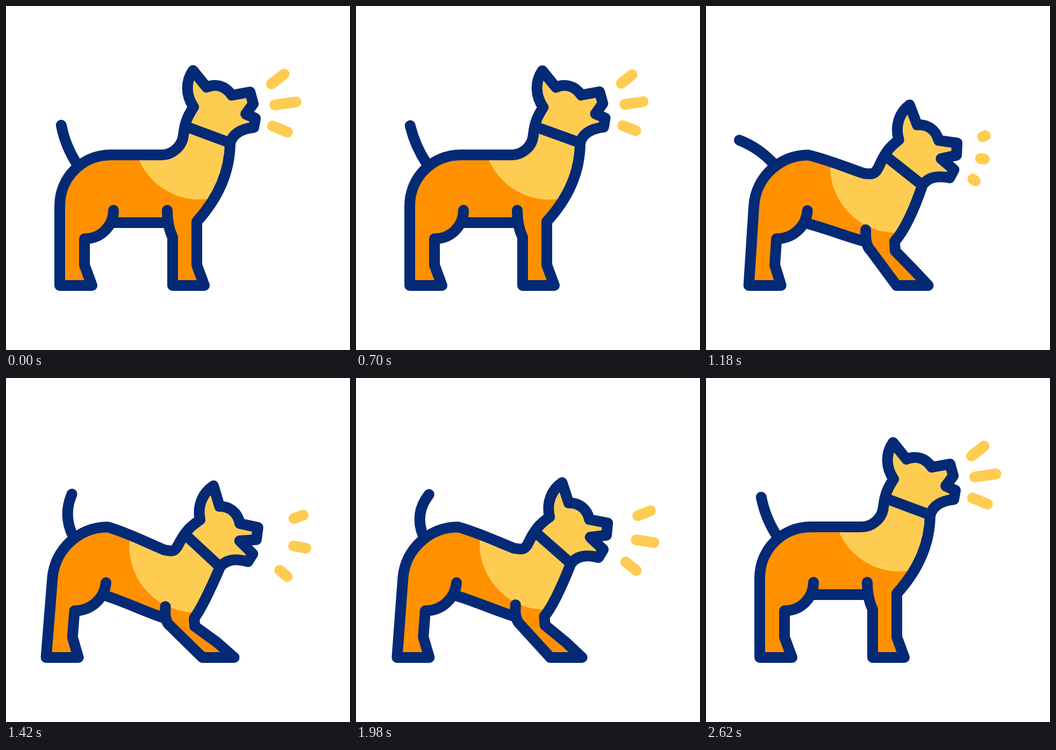
An HTML page with a canvas for the animation above (3000 ms loop, 640x640 px).

```html
<!DOCTYPE html>
<html lang="en">
<head>
<meta charset="utf-8">
<title>Barking dog</title>
<style>
html, body { margin: 0; height: 100%; overflow: hidden; background: #fff; }
canvas { display: block; width: 640px; height: 640px; }
</style>
</head>
<body>
<canvas id="stage" width="640" height="640"></canvas>
<script>
const ctx = document.getElementById('stage').getContext('2d');
const LOOP = 3000, NAVY = '#042a76', ORANGE = '#ff9100', YELLOW = '#ffcc52';
const GROW = 160, FADE = 250;

// The standing dog; the poses bend these paths.
const FORELEG = 'M300,380 C300,400 304,418 310,430 L310,520 369,520 355,482 355,430 355,401 ';
const BACK = ' 308,277 290,277 C258,277 227,277 195,277 C143,277 100,318 100,372 ' +
  'L100,520 160,520 146,482 146,433 C178,433 200,408 200,380 ';
const BELLY = '196,403 C231,403 266,403 302,403';
const COLLAR = 'M337,225 L415,254';
const NECK = { x: 349, y: 188 };

const BARKS = [220, 740, 1295, 1900, 2620];
const CROUCH = [[650, 0], [1530, 1], [1710, 1], [2590, 0]];
const REAR = [[220, 0], [440, 1.2], [740, 0]];
const WAG = [[220, -22], [420, -10], [620, -41], [800, 0], [1110, -62],
  [1440, -1], [1710, -60], [1990, 8], [2240, -39], [2620, -22]];

const rad = deg => deg * Math.PI / 180;
const clamp = u => Math.min(1, Math.max(0, u));
const sine = u => (1 - Math.cos(Math.PI * u)) / 2;
const quart = u => u < .5 ? 8 * u ** 4 : 1 - 8 * (1 - u) ** 4;
const ramp = (v, from, to) => sine(clamp((v - from) / (to - from)));

function track(t, keys, ease = sine) {
  const i = keys.findIndex(k => k[0] > t);
  if (i === 0) return keys[0][1];
  if (i < 0) return keys.at(-1)[1];
  const [t0, v0] = keys[i - 1], [t1, v1] = keys[i];
  return v0 + (v1 - v0) * ease((t - t0) / (t1 - t0));
}

// 0 hidden, 1 full length, 2 gone at the far end
function rayPhase(t) {
  if (t < BARKS[0] || t >= BARKS.at(-1)) return 1;
  for (const bark of BARKS) {
    const d = t - bark;
    if (d > -GROW && d < 0) return sine(1 + d / GROW);
    if (d >= 0 && d < FADE) return 1 + sine(d / FADE);
  }
  return 0;
}

// The mouth snaps shut briefly after each bark.
function mouthClosed(t) {
  const bark = BARKS.findLast(b => b <= t);
  return bark < BARKS.at(-1) ? Math.sin(Math.PI * clamp((t - bark - 160) / 220)) ** 2 : 0;
}

const bend = (path, move) =>
  path.replace(/([\d.]+),([\d.]+)/g, (_, x, y) => move(+x, +y).join());

function headPath(crouch, shut) {
  const mouth = `${446 - 14 * crouch - 6 * shut},${201 - 5 * crouch - 2 * shut}`;
  return `Q416,334 417,255 Q424,230 461,${226 - 4 * shut} L${464 - 3 * shut},${209 - 6 * shut} ` +
    `${mouth} 460,${182 + 8 * shut} 454,${160 + 3 * shut} 420,166 C408,148 390,144 373,151 ` +
    'L348,120 C334,140 334,166 349,188 C338,205 333,215 330,240 C328,262';
}

function tailPath([x, y], degrees) {
  const dx = 78 * Math.sin(rad(degrees)), dy = -78 * Math.cos(rad(degrees));
  const curl = -.0065 * (degrees + 37);
  return `M${x},${y} q${dx / 2 - dy * curl},${dy / 2 + dx * curl} ${dx},${dy}`;
}

function drawRays(x, y, tilt, radius, phase) {
  if (phase <= 0 || phase >= 2) return;
  const grow = Math.min(phase, 1), leave = Math.max(phase - 1, 0);
  ctx.beginPath();
  for (const i of [-1, 0, 1]) {
    const place = rad(15 * i - 1.5 + tilt), aim = rad(30 * i - 8 + tilt);
    const end = (40 - 10 * Math.abs(i)) * grow + 14 * leave;
    const point = d => [
      x + radius * Math.cos(place) + d * Math.cos(aim),
      y + radius * Math.sin(place) + d * Math.sin(aim)
    ];
    ctx.moveTo(...point(end * leave));
    ctx.lineTo(...point(end));
  }
  ctx.strokeStyle = YELLOW;
  ctx.stroke();
}

function draw(t) {
  const crouch = track(t, CROUCH, quart), rear = track(t, REAR);
  const neckX = NECK.x + 12 * crouch - 14 * rear, neckY = NECK.y + 76 * crouch + 9 * rear;
  const turn = rad(22.5 * crouch - 11 * rear);

  // The head is rigid and turns on the neck.
  const head = (x, y) => {
    const dx = x - NECK.x, dy = y - NECK.y, c = Math.cos(turn), s = Math.sin(turn);
    return [neckX + dx * c - dy * s, neckY + dx * s + dy * c];
  };
  // Crouching leans the body back, drops the shoulders and slides the forepaws out.
  const body = (x, y) => {
    const front = ramp(x, 190, 310);
    const drop = 46 * front * (1 - clamp((y - 401) / 119)) ** 1.3;
    const slide = front * (11 + 70 * ramp(y, 415, 520)) - 6 - .08 * (y - 277);
    return [x + crouch * slide, y + crouch * drop];
  };

  const outline = bend(FORELEG, body) + bend(headPath(crouch, mouthClosed(t)), head) + bend(BACK, body);
  const belly = bend(BELLY, body);
  const tail = tailPath(body(132, 294), track(t, WAG));

  ctx.clearRect(0, 0, 640, 640);
  ctx.lineWidth = 20;
  ctx.lineCap = ctx.lineJoin = 'round';

  const skin = new Path2D(outline + 'L' + belly);
  ctx.fillStyle = ORANGE;
  ctx.fill(skin);
  ctx.save();
  ctx.clip(skin);
  ctx.beginPath();
  ctx.arc(...head(360, 237), 123, 0, 2 * Math.PI);
  ctx.fillStyle = YELLOW;
  ctx.fill();
  ctx.restore();

  ctx.strokeStyle = NAVY;
  ctx.stroke(new Path2D(outline + 'M' + belly + bend(COLLAR, head) + tail));

  drawRays(neckX, neckY, 18 * crouch - 11 * rear, 151 + 6 * crouch + 18 * rear, rayPhase(t));
}

function frame() {
  draw(performance.now() % LOOP);
  requestAnimationFrame(frame);
}
frame();
</script>
</body>
</html>
```
